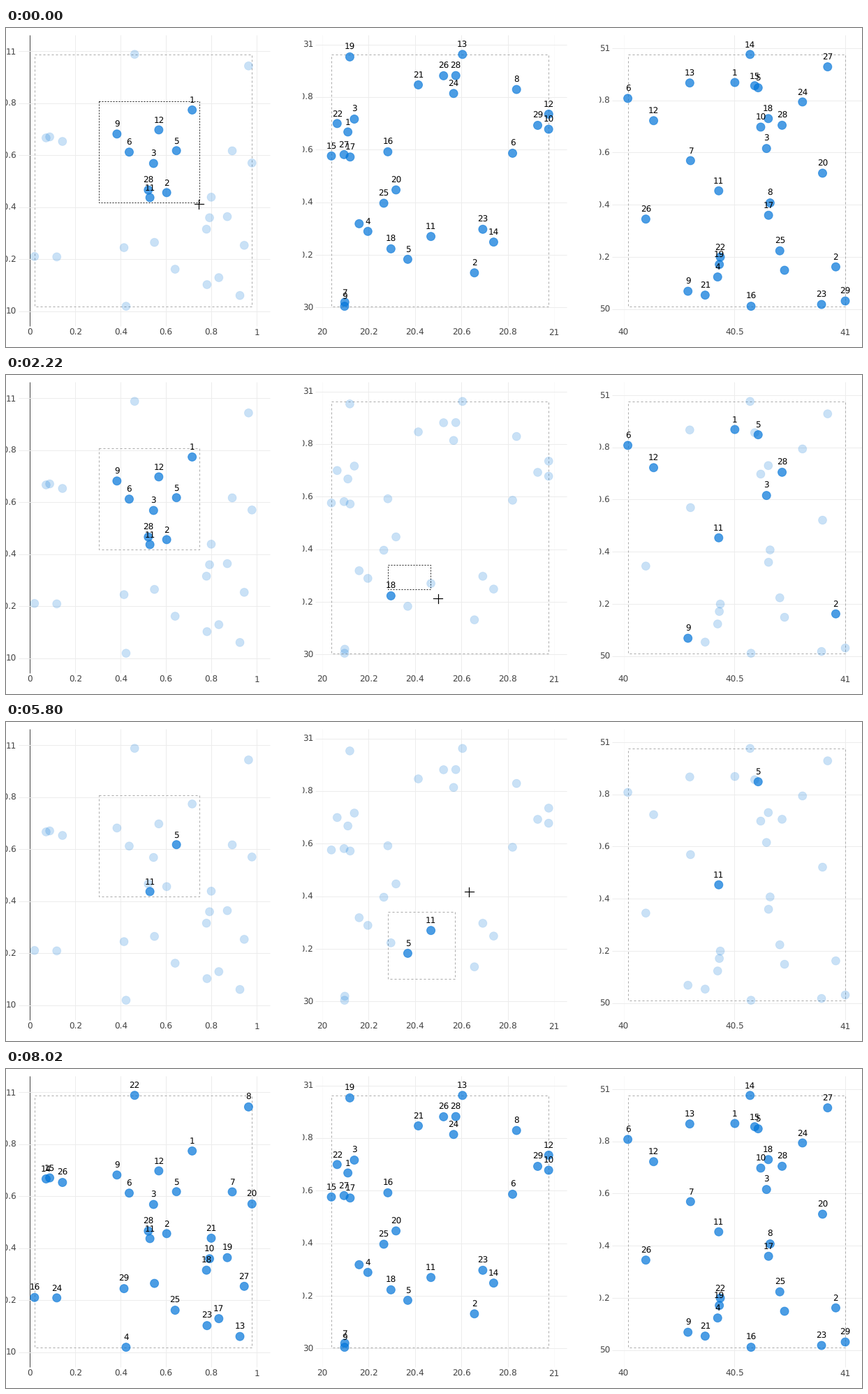
A matplotlib script for the animation above (9210 ms loop, 1226 by 457 pixels).

```python
import numpy as np
import matplotlib.pyplot as plt
from matplotlib.animation import FuncAnimation
from matplotlib.patches import Polygon, Rectangle

W, H, DPI = 1226, 457, 64
PX = 72 / DPI  # points per pixel
STEP = 30      # ms per drawn frame
LOOP = 9210

BLUE = (0, 116 / 255, 217 / 255)
INK, GRID, FAINT = "#444444", "#ececec", "#f9f9f9"
TOP, BOTTOM, SPAN = 10, 427, 360  # plot area of every panel

plt.rcParams.update({"font.family": "DejaVu Sans", "text.hinting": "none"})

fig = plt.figure(figsize=(W / DPI, H / DPI), dpi=DPI, facecolor="white")
ax = fig.add_axes([0, 0, 1, 1])
ax.set_xlim(0, W)
ax.set_ylim(H, 0)
ax.axis("off")

data = np.random.RandomState(0).rand(6, 30)


def line(xs, ys, color):
    ax.plot(xs, ys, color=color, lw=PX, zorder=1, solid_capstyle="butt")


def text(x, y, s, size=12, color=INK, ha="center", **kw):
    return ax.text(x, y, s, fontsize=size * PX, color=color, ha=ha,
                   va="baseline", **kw)


def dashed_rect(color, dash):
    return ax.add_patch(Rectangle((0, 0), 0, 0, fill=False, ec=color, lw=PX,
                                  ls=(0, (dash, dash)), zorder=2))


def place(patch, box):
    x0, y0, x1, y1 = box
    patch.set_bounds(x0, y0, x1 - x0, y1 - y0)


class Panel:
    """Scatter plot of two data rows; x0..x1 and y0..y1 hold one unit."""

    def __init__(self, row, left, x0, x1, y0, y1, ticks, faint):
        self.x = x0 + data[row] * (x1 - x0)
        self.y = y0 + data[row + 1] * (y1 - y0)
        self.extent = (self.x.min(), self.y.min(), self.x.max(), self.y.max())

        for v in np.linspace(0, 1, ticks):
            x = x0 + v * (x1 - x0)
            shade = FAINT if v in faint else GRID
            line([x, x], [TOP, BOTTOM], INK if row + v == 0 else shade)
            text(x, BOTTOM + 13, f"{row * 10 + v:g}")

        margin = Rectangle((left - 18, 0), 18, H, transform=ax.transData)
        for v in np.linspace(0, 1, 6):
            y = y0 + v * (y1 - y0)
            line([left, left + SPAN], [y, y], GRID)
            label = text(left - 3, y + 4.3, f"{row * 10 + 10 + v:g}",
                         ha="right", clip_on=True)
            label.set_clip_path(margin)

        self.outline = dashed_rect("#aaaaaa", 3)
        self.dots = ax.scatter(self.x, self.y, s=(12 * PX) ** 2,
                               linewidths=PX, zorder=3)
        self.labels = [text(x, y - 10.3, str(i) if i else "", color="black",
                            zorder=4)
                       for i, (x, y) in enumerate(zip(self.x, self.y))]

    def inside(self, box):
        x0, y0, x1, y1 = box
        return ((self.x >= x0) & (self.x <= x1)
                & (self.y >= y0) & (self.y <= y1))

    def show(self, chosen, box=None):
        alpha = np.where(chosen, 0.7, 0.21)
        self.dots.set_facecolor([(*BLUE, a) for a in alpha])
        self.dots.set_edgecolor([(*BLUE, a ** 1.5) for a in alpha])
        for on, label in zip(chosen, self.labels):
            label.set_visible(bool(on))
        place(self.outline, box or self.extent)


left = Panel(0, 18, 34.3, 359.2, 405.6, 33.4, 6, ())
mid = Panel(2, 443, 453, 785, 400.4, 23.6, 6, (0, 1))
right = Panel(4, 868, 884.5, 1202.4, 403, 28.7, 3, (0,))

drag = dashed_rect("#222222", 2)
cross = [ax.plot([], [], color="black", lw=1.2 * PX, zorder=6)[0]
         for _ in range(2)]


def hover_label(panel, i):
    x, y = panel.x[i] + 6, panel.y[i]
    x0, x1, y0, y1 = x + 5, x + 132.5, y - 18, y + 18.5
    box = Polygon([(x, y), (x0, y - 6), (x0, y0), (x1, y0), (x1, y1),
                   (x0, y1), (x0, y + 6)], closed=True, fc="#4d9ee4", ec=INK,
                  lw=PX, zorder=5)
    ax.add_patch(box)
    lines = (f"({20 + data[2, i]:.5f}, {30 + data[3, i]:.5f})", str(i))
    return [box] + [text(x0 + 3, y0 + 15 + 16 * k, s, 12.8, ha="left",
                         zorder=6, family="Liberation Sans")
                    for k, s in enumerate(lines)]


tip = hover_label(mid, 25)

# Pointer moves: start ms, end ms, stops, bend of the path, end point
MOVES = [
    (590, 1620, 8, (786, 331), (547, 271)),
    (1770, 2810, 8, (615, 287), (642.5, 369)),
    (4010, 4600, 5, (674, 315), (705, 261)),
    (5500, 5800, 3, (684, 252), (663, 243)),
    (6240, 6970, 6, (640, 390), (316.5, 214)),
]
REST, ENTRY, EXIT = (276, 252), (161, 229), (368, 330)


def pointer(t):
    """Jump along curved paths, slowing towards each end."""
    if t < MOVES[0][0]:
        return REST
    if t >= 7870:
        return EXIT
    start = ENTRY
    for t0, t1, stops, bend, end in MOVES:
        if t < t0:
            break
        if t < t1:
            k = int((t - t0) / (t1 - t0) * (stops - 1))
            s = np.sqrt(k / (stops - 1))
            return tuple((1 - s) ** 2 * a + 2 * s * (1 - s) * b + s * s * c
                         for a, b, c in zip(start, bend, end))
        start = end
    return start


FIRST_BOX = (133, 105, 277, 250)
SECOND_BOX = (547, 271.5, 643, 368)
EVERY = np.ones(30, bool)
first = left.inside(FIRST_BOX)
both = first & mid.inside(SECOND_BOX)


def show_all(a, b, c, left_box=None, mid_box=None):
    left.show(a, left_box)
    mid.show(b, mid_box)
    right.show(c)


def update(n):
    t = n * STEP + 20
    drag.set_visible(t < 290 or 1770 <= t < 3260)
    if t < 290:
        show_all(first, EVERY, EVERY)
        place(drag, FIRST_BOX)
    elif t < 1770 or 6240 <= t < 7420:
        show_all(first, first, first, FIRST_BOX)
    elif t < 3260:
        # the drawn box trails the pointer by one jump
        x, y = pointer(t - 147)
        corner = SECOND_BOX[:2]
        show_all(first, mid.inside((*corner, x, y + 12)), first, FIRST_BOX)
        place(drag, (*corner, x, y))
    elif t < 6240:
        show_all(both, both, both, FIRST_BOX, SECOND_BOX)
    else:
        show_all(EVERY, EVERY, EVERY)

    for part in tip:
        part.set_visible(3260 <= t < 4010)
    x, y = pointer(t)
    cross[0].set_data([x - 6.5, x + 6.5], [y, y])
    cross[1].set_data([x, x], [y - 6.5, y + 6.5])
    for arm in cross:
        arm.set_visible(t < 8020)
    return []


anim = FuncAnimation(fig, update, frames=LOOP // STEP, interval=STEP,
                     init_func=lambda: update(0), repeat=True, repeat_delay=0,
                     blit=False)
plt.show()
```
